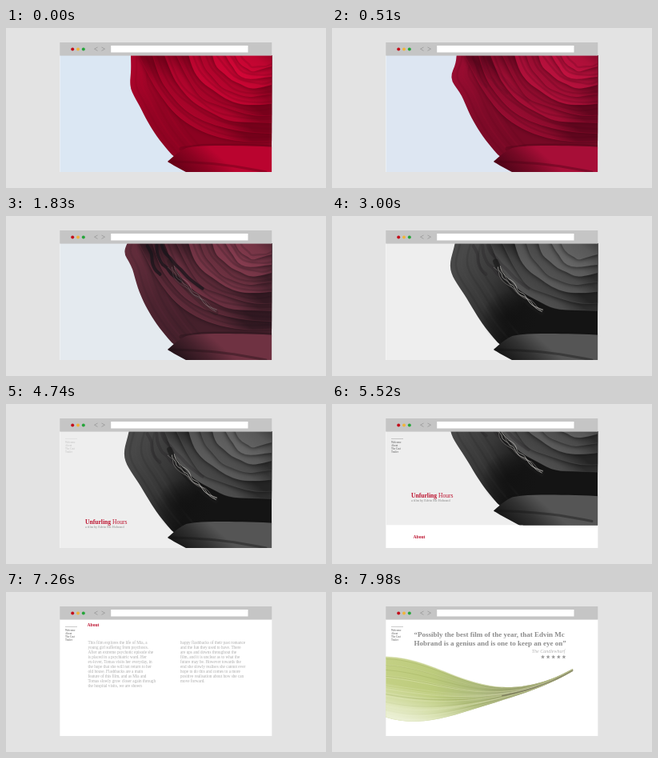
An HTML page with a canvas for the animation above (8 s loop, 400x200 px).

```html
<!DOCTYPE html>
<html lang="en">
<head>
<meta charset="utf-8">
<style>
  html, body { margin: 0; width: 100%; height: 100%; overflow: hidden; background: #e3e3e3; }
  canvas { display: block; width: 400px; height: 200px; }
</style>
</head>
<body>
<canvas id="stage"></canvas>
<script>
const LOOP = 8000;
const REVIEW_TOP = 300;
const SERIF = '"Liberation Serif", "Noto Serif", serif';
const canvas = document.getElementById('stage');
const ctx = canvas.getContext('2d');
const ratio = window.devicePixelRatio || 1;
canvas.width = 400 * ratio;
canvas.height = 200 * ratio;

const clamp = v => Math.max(0, Math.min(1, v));
const mix = (a, b, u) => a + (b - a) * u;
const mixAll = (a, b, u) => a.map((v, i) => mix(v, b[i], u));
const progress = (t, from, to) => clamp((t - from) / (to - from));
const smooth = u => u * u * (3 - 2 * u);
const bell = (v, center, width) => Math.exp(-(((v - center) / width) ** 2));
const rgb = c => `rgb(${c.map(Math.round).join()})`;
const noise = seed => {
  const v = Math.sin(seed * 127.1 + 3.7) * 43758.5453;
  return (v - Math.floor(v)) * 2 - 1;
};
const sample = (n, point) => Array.from({ length: n + 1 }, (_, i) => point(i / n, i));

// Point at u on the quadratic curve a-b-c
const bezier = (a, b, c, u) => mixAll(mixAll(a, b, u), mixAll(b, c, u), u);

// Curve roughened by seeded noise
const ragged = (a, b, c, n, rough, seed) => sample(n, (u, i) =>
  bezier(a, b, c, u).map((v, axis) => v + rough * noise(seed + i * 2 + axis)));

function trace(points) {
  points.forEach(([x, y], i) => {
    const next = points[i + 1];
    if (i && next) ctx.quadraticCurveTo(x, y, (x + next[0]) / 2, (y + next[1]) / 2);
    else ctx.lineTo(x, y);
  });
}

function stroke(points, color, width, alpha = 1) {
  ctx.save();
  ctx.globalAlpha *= alpha;
  ctx.strokeStyle = color;
  ctx.lineWidth = width;
  ctx.lineCap = ctx.lineJoin = 'round';
  ctx.beginPath();
  trace(points);
  ctx.stroke();
  ctx.restore();
}

function region(points, corners, fill) {
  ctx.beginPath();
  trace(points);
  corners.forEach(([x, y]) => ctx.lineTo(x, y));
  ctx.closePath();
  ctx.fillStyle = fill;
  ctx.fill();
}

function gradient(x1, y1, x2, y2, ...colors) {
  const g = ctx.createLinearGradient(x1, y1, x2, y2);
  colors.forEach((c, i) => g.addColorStop(i / (colors.length - 1), c));
  return g;
}

function text(str, x, y, size, color, style = '') {
  ctx.font = `${style} ${size}px ${SERIF}`;
  ctx.fillStyle = color;
  ctx.fillText(str, x, y);
  return ctx.measureText(str).width;
}

// Withering stages; bulge is the height, depth and spread of the outer petal's swelling
const stages = [
  { at: 0, back: [219, 231, 243], dark: [96, 0, 20], light: [218, 6, 56], bulge: [75, 5, 16] },
  { at: 990, back: [223, 230, 241], dark: [52, 6, 22], light: [184, 30, 76], bulge: [52, 14, 13] },
  { at: 1830, back: [228, 234, 239], dark: [30, 16, 22], light: [140, 62, 82], bulge: [45, 9, 13] },
  { at: 3000, back: [238, 238, 238], dark: [18, 18, 18], light: [108, 108, 108], bulge: [67, 11, 26] }
];

function petalEdge(u, seed) {
  const start = [mix(166, 286, u), 30];
  const bend = [mix(200, 300, u), mix(150, 66, u)];
  return ragged(start, bend, [338, mix(142, 48, u)], 7, 2.4, seed);
}

function rose(t) {
  const i = t < stages[1].at ? 0 : t < stages[2].at ? 1 : 2;
  const a = stages[i], b = stages[i + 1];
  const u = progress(t, a.at, b.at);
  const [back, dark, light, bulge] = ['back', 'dark', 'light', 'bulge'].map(k => mixAll(a[k], b[k], u));
  const shade = s => rgb(mixAll(dark, light, s));
  const decay = progress(t, 500, 3000);
  const gloom = smooth(progress(t, 1700, 3000));

  ctx.fillStyle = rgb(back);
  ctx.fillRect(67, 34, 266, 151);

  // Outer petal, with veins following its rim
  const rim = sample(14, s => {
    const y = mix(30, 158, s);
    return [156 + 51 * s ** 2.3 - bulge[1] * bell(y, bulge[0], bulge[2]), y];
  });
  region(rim, [[240, 186], [338, 186], [338, 30]],
    gradient(148, 75, 232, 125, shade(0.6), shade(0.42), shade(mix(0.36, 0.02, gloom))));
  for (let k = 1; k < 6; k++) {
    stroke(rim.map(([x, y]) => [x + k * 7, y - k * 2]), shade(k % 2 ? 0.1 : 0.7), 2.5, 0.14);
  }

  // Inner petals, outermost first; the first two wither away
  const count = 9;
  for (let k = 0; k < count; k++) {
    const edge = petalEdge(k / (count - 1), k * 31);
    const tone = 0.68 + 0.17 * noise(k + 5);
    const [x, y] = edge[3];
    ctx.save();
    ctx.globalAlpha = k < 2 ? 1 - gloom : 1;
    ctx.shadowColor = shade(0);
    ctx.shadowBlur = 6 * ratio;
    region(edge, [[338, 30]],
      gradient(x, y, x + 20, y - 26, shade(tone + 0.1), shade(tone), shade(tone - 0.32)));
    ctx.shadowBlur = 0;
    stroke(edge, shade(1), 0.7, 0.3);
    stroke(petalEdge((k + 0.45) / (count - 1), k * 17 + 9), shade(0), 2.5, 0.2 * (1 - gloom));
    ctx.restore();
  }

  // Deep shadow under the petals
  const deep = ctx.createRadialGradient(222, 127, 4, 222, 127, 34);
  deep.addColorStop(0, shade(0));
  deep.addColorStop(1, 'rgba(18,18,18,0)');
  ctx.save();
  ctx.globalAlpha = 0.9 * gloom;
  ctx.fillStyle = deep;
  ctx.fillRect(188, 93, 68, 68);
  ctx.restore();

  // Scorched edges, then the pale torn rim
  const scorch = progress(t, 350, 1700) * (1 - 0.7 * progress(t, 1900, 2900));
  for (let k = 0; k < 3; k++) {
    stroke(ragged([178 + k * 9, 37], [186 + k * 10, 66], [192 + k * 27, 74 + k * 8], 7, 2, k * 41),
      '#17151a', 4, scorch * 0.75);
  }
  const torn = progress(t, 1300, 2700);
  stroke(ragged([205, 58], [212, 84], [262, 121], 8, 1, 7), '#191919', 7, torn * 0.65);
  for (let k = 0; k < 4; k++) {
    stroke(ragged([204 + k * 2, 64], [214 + k * 3, 86], [262, 117 + k], 12, 2.6, k * 53),
      k % 2 ? '#c9c6c2' : '#817f7d', 0.8, torn * 0.8);
  }

  // Folded lower petal
  const fold = sample(8, s => [mix(202, 338, s), 167 - 18 * Math.sin(Math.PI * s ** 0.55) ** 0.8 - 18 * s * s]);
  stroke(fold.slice(1), shade(0), 5, 0.35);
  region(fold, [[338, 186], [236, 186], [210, 172]],
    gradient(226, 184, 256, 150, shade(0.08), shade(0.36), shade(0.74)));
  stroke(sample(6, s => [mix(204, 325, s), 167 + 13 * s * s]), shade(0), 3, 0.4);
}

function title(t) {
  const u = smooth(progress(t, 3330, 3810));
  const scale = mix(2.65, 1, u);
  ctx.save();
  ctx.globalAlpha = clamp(u * 1.6);
  ctx.translate(99, mix(122, 150.3, u));
  ctx.scale(scale, scale);
  const width = text('Unfurling ', 0, 0, 7.6, '#bd1430', 'bold');
  text('Hours', width, 0, 7.6, '#bd1430');
  ctx.restore();
  ctx.globalAlpha = progress(t, 3900, 4800);
  text('a film by Edvin Mc Hobrand', 99, 155.4, 4.2, '#858585');
  ctx.globalAlpha = 1;
}

const leftColumn = `This film explores the life of Mia, a
young girl suffering from psychosis.
After an extreme psychotic episode she
is placed in a psychiatric ward. Her
ex-lover, Tomas visits her everyday, in
the hope that she will not return to her
old house. Flashbacks are a main
feature of this film, and as Mia and
Tomas slowly grow closer again through
the hospital visits, we are shown`;
const rightColumn = `happy flashbacks of their past romance
and the fun they used to have. There
are ups and downs throughout the
film, and it is unclear as to what the
future may be. However towards the
end she slowly realises she cannot ever
hope to do this and comes to a more
positive realisation about how she can
move forward.`;

function paragraph(str, x) {
  str.split('\n').forEach((line, i) => text(line, x, 223.5 + i * 6, 5.2, '#adadad'));
}

function about() {
  text('About', 101.5, 201.5, 5.6, '#bd1430', 'bold');
  paragraph(leftColumn, 102.5);
  paragraph(rightColumn, 218);
}

function star(x, y, r) {
  ctx.beginPath();
  for (let k = 0; k < 10; k++) {
    const d = k % 2 ? r * 0.42 : r, angle = k * Math.PI / 5;
    ctx.lineTo(x + d * Math.sin(angle), y - d * Math.cos(angle));
  }
  ctx.fill();
}

// Line along the leaf: side -1 is the upper edge, 1 the lower
const leafLine = side => sample(24, q => {
  const spine = 118 + 36 * q - 57 * q ** 3;
  return [mix(66, 301, q), spine + side * (38 * bell(q, 0.08, 0.42) + 1.2)];
});

function leaf() {
  ctx.save();
  region(leafLine(-1), leafLine(1).reverse(),
    gradient(67, 0, 301, 0, '#c3d084', '#bccb7c', '#acb97c', '#8b9068', '#77735c'));
  ctx.clip();
  for (let k = 0; k < 30; k++) {
    stroke(leafLine(noise(k)), k % 3 ? '#e5ecc0' : '#8a9b48', 1, 0.25);
  }
  ctx.fillStyle = gradient(118, 125, 108, 163, 'rgba(244,247,226,0)', 'rgba(244,247,230,.8)');
  ctx.fillRect(66, 75, 240, 90);
  ctx.restore();
  stroke(leafLine(-1).slice(0, 16), '#eef2dc', 1, 0.6);
  stroke(leafLine(0.3).slice(15), '#5f5a49', 1.5, 0.6);
}

function review() {
  const grey = '#8c8c8c';
  text('“Possibly the best film of the year, that Edvin Mc', 102.5, 55, 9, grey, 'bold');
  text('Hobrand is a genius and is one to keep an eye on”', 102.5, 66, 9, grey, 'bold');
  ctx.textAlign = 'right';
  text('The Candlewharf', 291.5, 75, 6, '#b3b3b3', 'italic');
  ctx.textAlign = 'left';
  ctx.fillStyle = '#999';
  for (let k = 0; k < 5; k++) star(263.5 + k * 6.6, 80.7, 2.7);
  leaf();
}

function menu(t) {
  ctx.globalAlpha = progress(t, 4600, 5100);
  ctx.fillStyle = '#aaa';
  ctx.fillRect(74, 43, 15, 0.6);
  ['Welcome', 'About', 'The Cast', 'Trailer'].forEach((item, i) =>
    text(item, 74, 48.5 + i * 4, 3.3, '#555'));
  ctx.globalAlpha = 1;
}

function toolbar() {
  ctx.fillStyle = '#c5c5c5';
  ctx.fillRect(67.3, 18, 265, 16.6);
  ['#c30d1b', '#f0b43c', '#25a53a'].forEach((color, i) => {
    ctx.beginPath();
    ctx.arc(83.2 + i * 6.8, 26.6, 2, 0, 7);
    ctx.fillStyle = color;
    ctx.fill();
  });
  for (const [x, d] of [[112.5, -2], [121.5, 2]]) {
    ctx.beginPath();
    ctx.moveTo(x - d, 24);
    ctx.lineTo(x + d, 26.2);
    ctx.lineTo(x - d, 28.4);
    ctx.strokeStyle = '#999';
    ctx.lineWidth = 0.8;
    ctx.stroke();
  }
  ctx.fillStyle = '#fff';
  ctx.fillRect(131.2, 22, 171.3, 8.5);
}

function clipTo(y, height) {
  ctx.beginPath();
  ctx.rect(67.3, y, 265, height);
  ctx.clip();
}

function draw(t) {
  const scroll = 154 * progress(t, 5280, 6390)
    + (REVIEW_TOP - 154) * smooth(progress(t, 7170, 8010));
  ctx.setTransform(ratio, 0, 0, ratio, 0, 0);
  ctx.fillStyle = '#e3e3e3';
  ctx.fillRect(0, 0, 400, 200);
  ctx.save();
  clipTo(34, 146);
  ctx.fillStyle = '#fff';
  ctx.fillRect(67, 34, 266, 146);
  ctx.translate(0, -scroll);
  ctx.save();
  clipTo(34, 151);
  rose(t);
  title(t);
  ctx.restore();
  about();
  ctx.translate(0, REVIEW_TOP);
  review();
  ctx.restore();
  menu(t);
  toolbar();
}

function tick() {
  draw(performance.now() % LOOP);
  requestAnimationFrame(tick);
}
tick();
</script>
</body>
</html>
```
